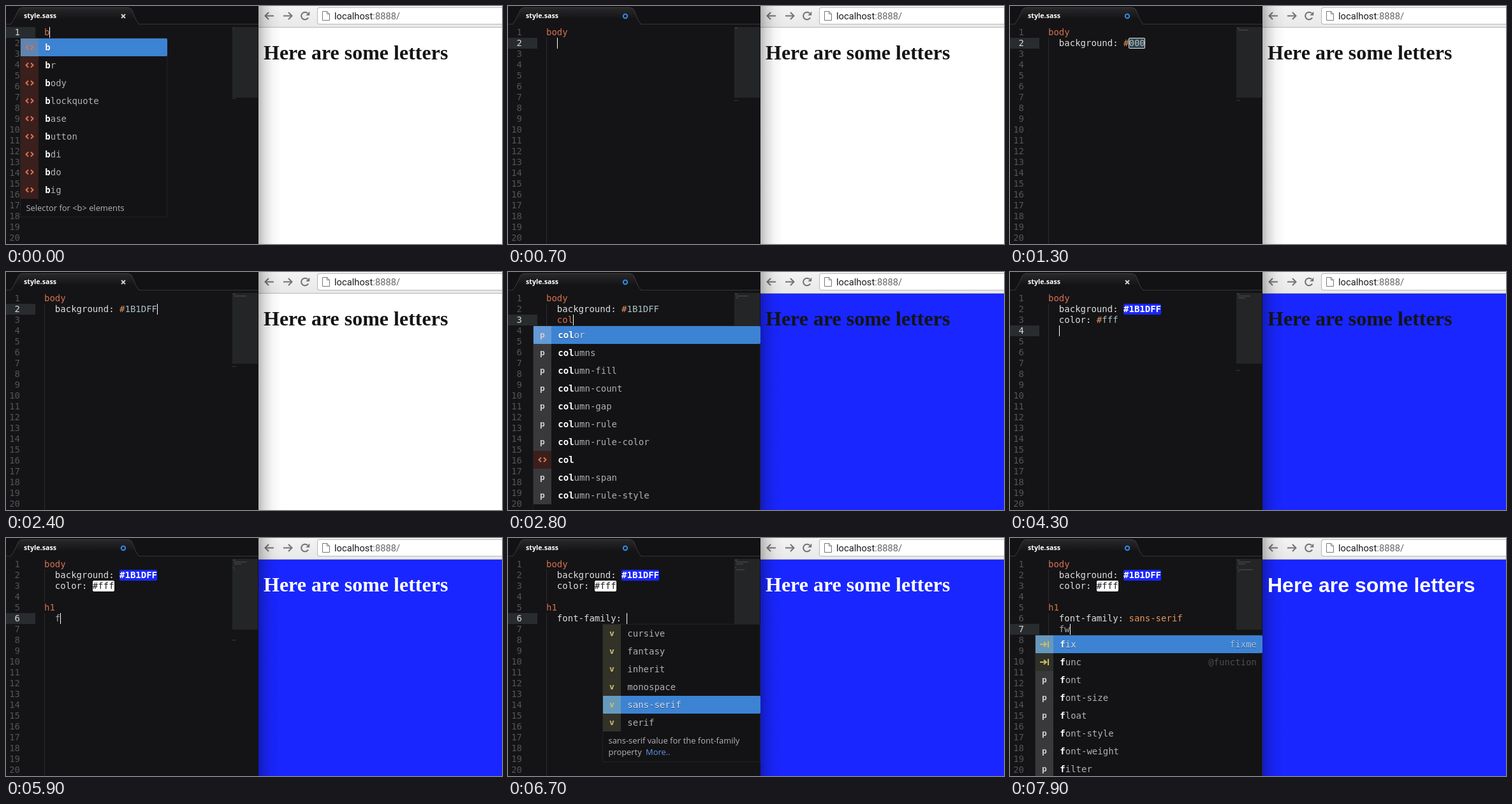
These frames come from a looping animation (778x374 px, 8000 ms). An HTML page with a canvas:

```html
<!DOCTYPE html>
<html lang="en">
<head>
<meta charset="utf-8">
<title>Live editing</title>
<style>
html, body { margin: 0; width: 100%; height: 100%; overflow: hidden; background: #141416; }
canvas { display: block; width: 778px; height: 374px; }
</style>
</head>
<body>
<canvas id="stage" width="778" height="374"></canvas>
<script>
const ctx = document.getElementById('stage').getContext('2d');
const LOOP = 8000, CHAR = 8.43, LEFT = 60, ROW = 17, ITEM = 28, EDGE = 396;
const MONO = '"DejaVu Sans Mono", monospace';
const UI = '"Open Sans", sans-serif';
const BG = '#141416', ORANGE = '#d5704f', BLUE = '#1926ff';

// Completion lists: a kind letter (t tag, p property, v value, s snippet), then the word
const LISTS = {
  b: 't:b t:br t:body t:blockquote t:base t:button t:bdi t:bdo t:big',
  body: 't:body',
  bprop: 'p:background p:border p:bottom p:box-shadow p:box-sizing t:b t:br p:border-top p:border-left p:background-size',
  col: 'p:color p:columns p:column-fill p:column-count p:column-gap p:column-rule p:column-rule-color t:col p:column-span p:column-rule-style',
  h: 't:hr t:h1 t:h2 t:h3 t:h4 t:h5 t:h6 t:html t:head',
  family: 'v:cursive v:fantasy v:inherit v:monospace v:sans-serif v:serif',
  f: 's:fix:fixme s:func:@function p:font p:font-size p:float p:font-style p:font-weight p:filter'
};
const pop = (list, prefix = '', sel = 0, foot = [], right = EDGE) => ({ list, prefix, sel, foot, right });
const tagPop = (list, prefix, name) => pop(list, prefix, 0, [`Selector for <${name}> elements`], 253);
const famPop = (sel, name) => pop('family', '', sel, [`${name} value for the font-family`, 'property']);

const bg = '  background: #', blue = bg + '1B1DFF';
const doc1 = ['body', blue];
const doc2 = [...doc1, '  color: #fff'];
const doc3 = [...doc2, '', 'h1'];
const doc4 = [...doc3, '  font-family: sans-serif'];

// Each step changes only the fields it names
const STEPS = [
  [0, { code: ['b'], pop: tagPop('b', 'b', 'b'), saved: true, page: 0, marks: 0, box: false, caret: true }],
  [100, { code: ['bo'], saved: false }],
  [200, { code: ['bod'], pop: tagPop('body', 'bod', 'body') }],
  [300, { code: ['body'], pop: tagPop('body', 'body', 'body') }],
  [400, { pop: null }],
  [700, { code: ['body', '  '] }],
  [800, { code: ['body', '  b'] }],
  [900, { pop: pop('bprop', 'b') }],
  [1000, { code: ['body', '  bg'] }],
  [1100, { pop: null }],
  [1200, { code: ['body', bg + '000'], box: true, caret: false }],
  [1700, { code: ['body', bg + '1'], box: false, caret: true }],
  [1800, { code: ['body', bg + '1B'] }],
  [1900, { code: ['body', bg + '1B1'] }],
  [2100, { code: ['body', bg + '1B1D'] }],
  [2200, { code: ['body', bg + '1B1DF'] }],
  [2300, { code: doc1 }],
  [2400, { saved: true }],
  [2500, { code: [...doc1, '  '], page: 1 }],
  [2600, { code: [...doc1, '  c'] }],
  [2700, { code: [...doc1, '  co'], pop: pop('col', 'co'), saved: false }],
  [2800, { code: [...doc1, '  col'], pop: pop('col', 'col') }],
  [2900, { code: [...doc1, '  color: '], pop: null }],
  [3000, { marks: 1 }],
  [3500, { code: [...doc1, '  color: #'] }],
  [3600, { code: [...doc1, '  color: #f'] }],
  [3700, { code: [...doc1, '  color: #ff'] }],
  [3800, { code: doc2 }],
  [4100, { code: [...doc2, '  '] }],
  [4200, { saved: true }],
  [4400, { page: 2, marks: 2 }],
  [4500, { code: [...doc2, '', '  '] }],
  [4600, { code: [...doc2, '', ''] }],
  [4700, { code: [...doc2, '', 'h'], saved: false }],
  [4800, { pop: tagPop('h', 'h', 'hr') }],
  [4900, { code: doc3, pop: null }],
  [5000, { code: [...doc3, '  '] }],
  [5900, { code: [...doc3, '  f'] }],
  [6000, { pop: pop('f', 'f') }],
  [6100, { code: [...doc3, '  ff'] }],
  [6200, { pop: null }],
  [6400, { code: [...doc3, '  font-family: '] }],
  [6500, { pop: famPop(0, 'cursive') }],
  [6600, { pop: famPop(5, 'serif') }],
  [6700, { pop: famPop(4, 'sans-serif') }],
  [6800, { code: doc4, pop: null }],
  [7100, { code: [...doc4, '  '] }],
  [7200, { saved: true }],
  [7300, { page: 3 }],
  [7500, { caret: false }],
  [7700, { code: [...doc4, '  f'], saved: false, caret: true }],
  [7800, { pop: pop('f', 'f') }],
  [7900, { code: [...doc4, '  fw'] }]
];

function rect(x, y, w, h, color) {
  ctx.fillStyle = color;
  ctx.fillRect(x, y, w, h);
}
function round(x, y, w, h, r, color) {
  ctx.fillStyle = color;
  ctx.beginPath();
  ctx.roundRect(x, y, w, h, r);
  ctx.fill();
}
function text(str, x, y, color, font = '14px ' + MONO, align = 'left') {
  ctx.font = font;
  ctx.textAlign = align;
  ctx.fillStyle = color;
  ctx.fillText(str, x, y);
}
function path(points, color, width = 1, fill) {
  ctx.beginPath();
  points.forEach(([x, y], i) => i ? ctx.lineTo(x, y) : ctx.moveTo(x, y));
  if (fill) { ctx.fillStyle = fill; ctx.fill(); }
  ctx.strokeStyle = color;
  ctx.lineWidth = width;
  ctx.stroke();
}
function fade(x0, y0, x1, y1, ...stops) {
  const g = ctx.createLinearGradient(x0, y0, x1, y1);
  stops.forEach(([at, color]) => g.addColorStop(at, color));
  return g;
}
const colX = n => LEFT + n * CHAR;
const lineY = n => 33 + n * ROW;

function drawTab(saved) {
  rect(0, 0, EDGE, 29, '#121214');
  rect(0, 28, EDGE, 1, '#353537');
  path([[7, 29], [12, 22], [20, 5], [24, 2.5], [192, 2.5], [197, 5], [204, 22], [209, 29]],
    '#3b3b3d', 1, fade(0, 2, 0, 29, [0, '#29292b'], [0.7, BG], [1, BG]));
  rect(9, 28, 198, 2, BG);
  text('style.sass', 28, 19, '#fff', 'bold 10.7px ' + UI);
  if (saved) {
    path([[181, 13], [187, 19]], '#d5d5d5', 1.8);
    path([[187, 13], [181, 19]], '#d5d5d5', 1.8);
  } else {
    ctx.beginPath();
    ctx.arc(184, 16, 3.2, 0, 7);
    ctx.strokeStyle = '#3188e8';
    ctx.lineWidth = 2;
    ctx.stroke();
  }
}

function drawLine(str, n, s) {
  const y = lineY(n) + 13;
  const body = str.trimStart(), indent = str.length - body.length;
  const colon = body.indexOf(':') + 1;
  if (!colon) {
    const tag = !indent || /^(b|col)$/.test(body);
    text(body, colX(indent), y, tag ? ORANGE : '#a6a6a8');
    return;
  }
  text(body.slice(0, colon), colX(indent), y, '#dedede');
  const value = body.slice(colon + 1), at = indent + colon + 1, x = colX(at);
  if (value[0] !== '#') return text(value, x, y, '#e8925c');
  if (n <= s.marks) {
    const first = n === 1;
    round(Math.round(x), lineY(n), Math.round(value.length * CHAR), ROW, 2, first ? BLUE : '#fff');
    text(value, x, y, first ? '#fff' : '#202020', (first ? 'bold ' : '') + '14px ' + MONO);
    return;
  }
  if (s.box) {
    round(186, lineY(n), 26, ROW, 2, '#e4e7e8');
    round(187, lineY(n) + 1, 24, ROW - 2, 1, '#34424c');
  }
  text('#', x, y, '#e8925c');
  text(value.slice(1), colX(at + 1), y, '#a8c0c4');
}

function drawMinimap(code) {
  rect(355, 33, 40, 111, '#242527');
  code.forEach((str, n) => {
    const body = str.trimStart();
    if (body) rect(356 + str.length - body.length, 34 + n * 3, body.length, 1.5, '#424345');
  });
  rect(355, 142 + code.length * 3, 6, 1, '#38393b');
}

function drawEditor(s) {
  rect(0, 0, EDGE, 374, BG);
  drawTab(s.saved);
  const last = s.code.length - 1, cur = s.code[last];
  rect(0, lineY(last), 46, ROW, '#292c2f');
  for (let n = 0; n < 20; n++)
    text(n + 1, 22, lineY(n) + 13, n === last ? '#d8d8d8' : '#535456', undefined, 'right');
  if (last > 0)
    for (let n = 1; n < 21; n++)
      if (!/^\w/.test(s.code[n] || '')) rect(60, lineY(n), 1, ROW, '#2b2b2d');
  s.code.forEach((str, n) => drawLine(str, n, s));
  if (s.caret) rect(Math.round(colX(cur.length)), lineY(last), 1, ROW, '#fff');
  drawMinimap(s.code);
  if (s.pop) drawPopup(s.pop, last, cur);
}

const KIND = {
  t: ['#3a1f1c', '#6085b2', '#dc7152'],
  p: ['#39393b', '#639ad7', '#cfcfcf'],
  v: ['#323229', '#669abd', '#cdbf6d'],
  s: ['#30302a', '#6698bd', '#c8bd62']
};

function drawIcon(kind, x, y, on) {
  const [back, active, ink] = KIND[kind];
  rect(x, y, 28, ITEM, on ? active : back);
  const cx = x + 14, cy = y + 14;
  if (kind === 't') {
    for (const d of [-1, 1])
      path([[cx + 2 * d, cy - 3.5], [cx + 5.5 * d, cy], [cx + 2 * d, cy + 3.5]], ink, 2);
  } else if (kind === 's') {
    path([[cx - 7, cy], [cx + 2, cy]], ink, 2);
    path([[cx - 1, cy - 3.5], [cx + 3, cy], [cx - 1, cy + 3.5]], ink, 2);
    path([[cx + 6, cy - 5], [cx + 6, cy + 5]], ink, 2);
  } else {
    text(kind, cx, cy + 4, ink, 'bold 13px ' + MONO, 'center');
  }
}

function drawPopup(p, line, cur) {
  const items = LISTS[p.list].split(' ').map(i => i.split(':'));
  const word = cur.match(/[\w-]*$/)[0];
  const left = Math.round(colX(cur.length - word.length)) - 37;
  const top = lineY(line) + 18, width = p.right - left;
  const end = top + items.length * ITEM;
  const height = items.length * ITEM + (p.foot.length > 1 ? 47 : 28);
  ctx.save();
  ctx.beginPath();
  ctx.rect(0, 0, EDGE, 374);
  ctx.clip();
  rect(left - 1, top - 1, width + 1, height + 2, '#222224');
  rect(left, top, width - 1, height, '#131315');
  items.forEach(([kind, name, note], i) => {
    const y = top + i * ITEM, on = i === p.sel;
    if (on) round(left, y, width, ITEM, 2, '#3d83d3');
    drawIcon(kind, left, y, on);
    if (on) {
      ctx.shadowColor = 'rgba(0,0,0,.45)';
      ctx.shadowOffsetY = 1;
    }
    const x = left + 38.3, k = p.prefix.length;
    text(name.slice(0, k), x, y + 19, '#fff', 'bold 14px ' + MONO);
    text(name.slice(k), x + k * CHAR, y + 19, on ? '#d6e3f3' : '#b0b0b2');
    if (note) text(note, 387, y + 19, on ? '#a9c6e8' : '#4d4d4f', undefined, 'right');
    ctx.shadowColor = 'transparent';
    ctx.shadowOffsetY = 0;
  });
  p.foot.forEach((str, i) => text(str, left + 8.5, end + 19 + i * 18, '#b4b4b6', '12.9px ' + UI));
  if (p.foot.length > 1) text('More..', left + 67, end + 37, '#5b9ae6', '12.9px ' + UI);
  ctx.restore();
}

function drawBrowser(page) {
  rect(EDGE, 0, 382, 34, fade(0, 0, 0, 33, [0, '#f3f3f3'], [1, '#e9e9e9']));
  rect(EDGE, 33, 382, 1, '#b9b9b9');
  rect(EDGE, 34, 382, 340, page ? BLUE : '#fff');
  for (const [x, d] of [[413, 1], [442, -1]]) {
    path([[x - 6 * d, 15.5], [x + 7 * d, 15.5]], '#737373', 2);
    path([[x - d, 10], [x - 6.5 * d, 15.5], [x - d, 21]], '#737373', 2);
  }
  ctx.beginPath();
  ctx.arc(469, 15.5, 5.8, 0.5, 5.5);
  ctx.strokeStyle = '#737373';
  ctx.lineWidth = 2;
  ctx.stroke();
  path([[476, 9], [476, 14.5], [470.5, 14.5]], '#737373', 0.5, '#737373');
  round(488, 2, 300, 27, 4, '#b7b7b7');
  round(489, 3, 300, 25, 3, '#fff');
  path([[496.5, 8.5], [503.5, 8.5], [507.5, 12.5], [507.5, 22.5], [496.5, 22.5], [496.5, 8.5]], '#767676', 1, '#fff');
  path([[503.5, 8.5], [503.5, 12.5], [507.5, 12.5]], '#767676');
  const font = '14.75px Roboto, sans-serif';
  text('localhost', 515, 21, '#1c1c1c', font);
  text(':8888/', 515 + ctx.measureText('localhost').width, 21, '#666', font);
  rect(EDGE, 0, 36, 374, fade(EDGE, 0, EDGE + 36, 0,
    [0, 'rgba(0,0,0,.27)'], [0.25, 'rgba(0,0,0,.14)'], [0.6, 'rgba(0,0,0,.04)'], [1, 'rgba(0,0,0,0)']));
  const face = page === 3 ? '"Liberation Sans", sans-serif' : '"Liberation Serif", serif';
  text('Here are some letters', 404, page === 3 ? 85 : 84, page > 1 ? '#fff' : '#141414', 'bold 32px ' + face);
}

function draw(now) {
  const t = now % LOOP, s = {};
  for (const [at, change] of STEPS) if (at <= t) Object.assign(s, change);
  drawBrowser(s.page);
  drawEditor(s);
}

const start = performance.now();
function frame() {
  draw(performance.now() - start);
  requestAnimationFrame(frame);
}
frame();
</script>
</body>
</html>
```
